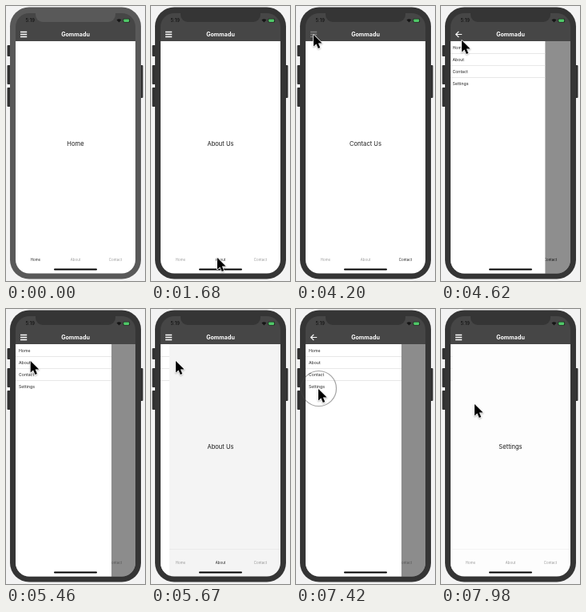
Write an HTML page with a canvas that moves like this. It is 174 by 344 pixels and loops after 8 s.

```html
<!DOCTYPE html>
<html lang="en">
<head>
<meta charset="utf-8">
<title>Phone drawer demo</title>
<style>
  html, body { margin: 0; width: 100%; height: 100%; overflow: hidden; background: #f3f3f3; }
  canvas { display: block; width: 174px; height: 344px; }
</style>
</head>
<body>
<canvas id="stage"></canvas>
<script>
const W = 174, H = 344, LOOP = 8000, STEP = 70;
const FONT = 'Inter, Roboto, "Liberation Sans", sans-serif';
const TABS = [['Home', 37], ['About', 87], ['Contact', 137]];
const MENU = ['Home', 'About', 'Contact', 'Settings'];
const DRAWER = 120;

// Start time, title and highlighted tab
const PAGES = [
  [0, 'Home', 0], [1540, 'About Us', 1], [2660, 'Contact Us', 2],
  [5390, 'About Us', 1], [7770, 'Settings', -1]
];

// Time, x and y of the pointer tip
const PATH = [
  [420, 66, 346], [700, 72, 331], [1120, 80, 315], [1610, 80, 315],
  [1680, 83, 315], [2030, 119, 319], [2100, 119, 319], [2170, 129, 318],
  [2590, 129, 318], [2730, 124, 319], [2800, 124, 319], [3080, 14, 130],
  [3220, -1, 101], [3640, 9, 58], [3920, 22, 36], [4410, 22, 36],
  [4620, 26, 43], [4970, 30, 65], [5670, 31, 65], [6090, 23, 32],
  [6160, 22, 36], [6510, 22, 36], [6650, 24, 40], [7280, 28, 100],
  [7700, 28, 100], [7980, 42, 119]
];

// Press and release times with the ring centre
const PRESSES = [
  [1190, 1470, 80.5, 315.5], [2170, 2520, 129, 318], [4060, 4200, 22, 36],
  [5110, 5250, 30.5, 65.5], [6370, 6580, 22, 36], [7420, 7630, 28.5, 99.5]
];

const canvas = document.getElementById('stage');
const ctx = canvas.getContext('2d');
const dpr = window.devicePixelRatio || 1;
canvas.width = W * dpr;
canvas.height = H * dpr;

const last = (list, t) => list.filter(item => item[0] <= t).pop();
const clamp = v => Math.max(0, Math.min(1, v));

function spring(ms, rate) {
  const x = Math.max(0, ms) * rate;
  return 1 - (1 + x) * Math.exp(-x);
}

function drawerAt(t) {
  if (t < 5390) return spring(t - 4235, 0.0164) * (1 - 0);
  if (t < 6400) return 1 - spring(t - 5475, 0.0205);
  if (t < 7700) return spring(t - 6540, 0.0164);
  return 1 - spring(t - 7705, 0.0215);
}

function pointerAt(t) {
  if (t < PATH[0][0]) return null;
  const i = PATH.findIndex(p => p[0] > t);
  if (i < 0) return PATH[PATH.length - 1].slice(1);
  const a = PATH[i - 1], b = PATH[i];
  const k = (t - a[0]) / (b[0] - a[0]);
  return [a[1] + (b[1] - a[1]) * k, a[2] + (b[2] - a[2]) * k];
}

function box(x, y, w, h, fill) {
  ctx.fillStyle = fill;
  ctx.fillRect(x, y, w, h);
}

function round(x, y, w, h, r, fill) {
  ctx.beginPath();
  ctx.roundRect(x, y, w, h, r);
  ctx.fillStyle = fill;
  ctx.fill();
}

function label(str, x, y, size, color, align = 'center', weight = 400) {
  ctx.font = `${weight} ${size}px ${FONT}`;
  ctx.textAlign = align;
  ctx.fillStyle = color;
  ctx.fillText(str, x, y);
}

function line(points, width, color) {
  ctx.beginPath();
  points.forEach(([x, y]) => ctx.lineTo(x, y));
  ctx.lineWidth = width;
  ctx.strokeStyle = color;
  ctx.stroke();
}

function drawBody(shell) {
  box(0, 0, W, H, '#f3f3f3');
  [[49, 14], [74, 24], [102, 24]].forEach(([y, h]) => round(1.5, y, 5, h, 1, '#303030'));
  round(167, 74, 4.5, 41, 1, '#303030');
  round(5, 1.5, 164, 340, 24, shell);
}

function drawPage(page) {
  box(12, 44, 150, 291, '#fff');
  label(page[1], 87, 175.3, 7.6, '#1c1c1c');
  TABS.forEach(([name, x], i) =>
    label(name, x, 318.7, 4.4, i === page[2] ? '#222' : '#9b9b9b'));
}

function drawDrawer(p) {
  if (p < 0.004) return;
  if (p < 0.2) box(12, 300, 150, 0.6, '#eee');
  box(12, 44, 150, 291, `rgba(0,0,0,${0.45 * p})`);
  ctx.save();
  ctx.translate(12 - DRAWER * (1 - p), 44);
  box(0, 0, DRAWER, 291, '#fff');
  MENU.forEach((name, i) => {
    label(name, 4, 9.6 + i * 15.2, 5.2, '#222', 'left');
    if (i < 3) box(0, 15 + i * 15.1, DRAWER, 0.6, '#d8d8d8');
  });
  ctx.restore();
}

function drawHeader(t, shell) {
  box(12, 9, 150, 35, '#464646');
  round(37, 4, 100, 16, [0, 0, 9, 9], shell);
  label('5:19', 24.5, 20.3, 5.8, '#111', 'left', 500);

  // Wi-Fi and battery
  ctx.beginPath();
  ctx.moveTo(141.5, 20.4);
  ctx.arc(141.5, 20.4, 4.2, -Math.PI * 0.75, -Math.PI * 0.25);
  ctx.closePath();
  ctx.fillStyle = '#151515';
  ctx.fill();
  round(146.5, 15.8, 8.6, 4.8, 1.3, '#1c2a1f');
  round(147.3, 16.5, 6.8, 3.4, 0.8, '#4fc868');

  label('Gommadu', 87, 37.6, 7.1, '#fff', 'center', 700);

  const opened = (t >= 4235 && t < 5390) || (t >= 6540 && t < 7770);
  const tap = last([[4060, 4200], [6370, 6510]], t);
  ctx.globalAlpha = tap ? (t < tap[1] ? 0.3 : 0.3 + 0.7 * clamp((t - tap[1]) / 300)) : 1;
  if (opened) {
    line([[26.2, 35.5], [18.8, 35.5]], 1.2, '#fff');
    line([[22.3, 31.8], [18.6, 35.5], [22.3, 39.2]], 1.2, '#fff');
  } else {
    [32.5, 35.5, 38.5].forEach(y => line([[18, y], [26.2, y]], 1.4, '#fff'));
  }
  ctx.globalAlpha = 1;
}

function drawPress(t) {
  const press = PRESSES.find(p => t >= p[0] && t < p[1]);
  if (!press) return;
  ctx.beginPath();
  ctx.arc(press[2], press[3], 22, 0, Math.PI * 2);
  ctx.lineWidth = 1.2;
  ctx.strokeStyle = 'rgba(70,70,70,.5)';
  ctx.stroke();
}

function drawPointer(tip) {
  if (!tip) return;
  ctx.save();
  ctx.translate(tip[0], tip[1]);
  ctx.beginPath();
  [[0, 0], [0, 14.5], [3.4, 11.4], [5.8, 17], [8.2, 16], [5.9, 10.6], [10.6, 10.6]]
    .forEach(([x, y]) => ctx.lineTo(x, y));
  ctx.closePath();
  ctx.shadowColor = 'rgba(0,0,0,.3)';
  ctx.shadowBlur = 2 * dpr;
  ctx.shadowOffsetY = dpr;
  ctx.lineWidth = 1.4;
  ctx.lineJoin = 'round';
  ctx.strokeStyle = '#fff';
  ctx.stroke();
  ctx.shadowColor = 'transparent';
  ctx.fillStyle = '#000';
  ctx.fill();
  ctx.restore();
}

function draw(t) {
  const shell = t < 1330 ? '#595959' : '#353535';
  ctx.setTransform(dpr, 0, 0, dpr, 0, 0);
  drawBody(shell);
  ctx.save();
  ctx.beginPath();
  ctx.roundRect(12, 9, 150, 325.5, 17);
  ctx.clip();
  drawPage(last(PAGES, t));
  drawDrawer(drawerAt(t));
  drawHeader(t, shell);
  round(60, 328.5, 54, 2, 1, '#000');
  ctx.restore();
  drawPress(t);
  drawPointer(pointerAt(t));
}

const start = performance.now();
function tick() {
  const t = (performance.now() - start) % LOOP;
  draw(Math.floor(t / STEP) * STEP);
  requestAnimationFrame(tick);
}
tick();
</script>
</body>
</html>
```
